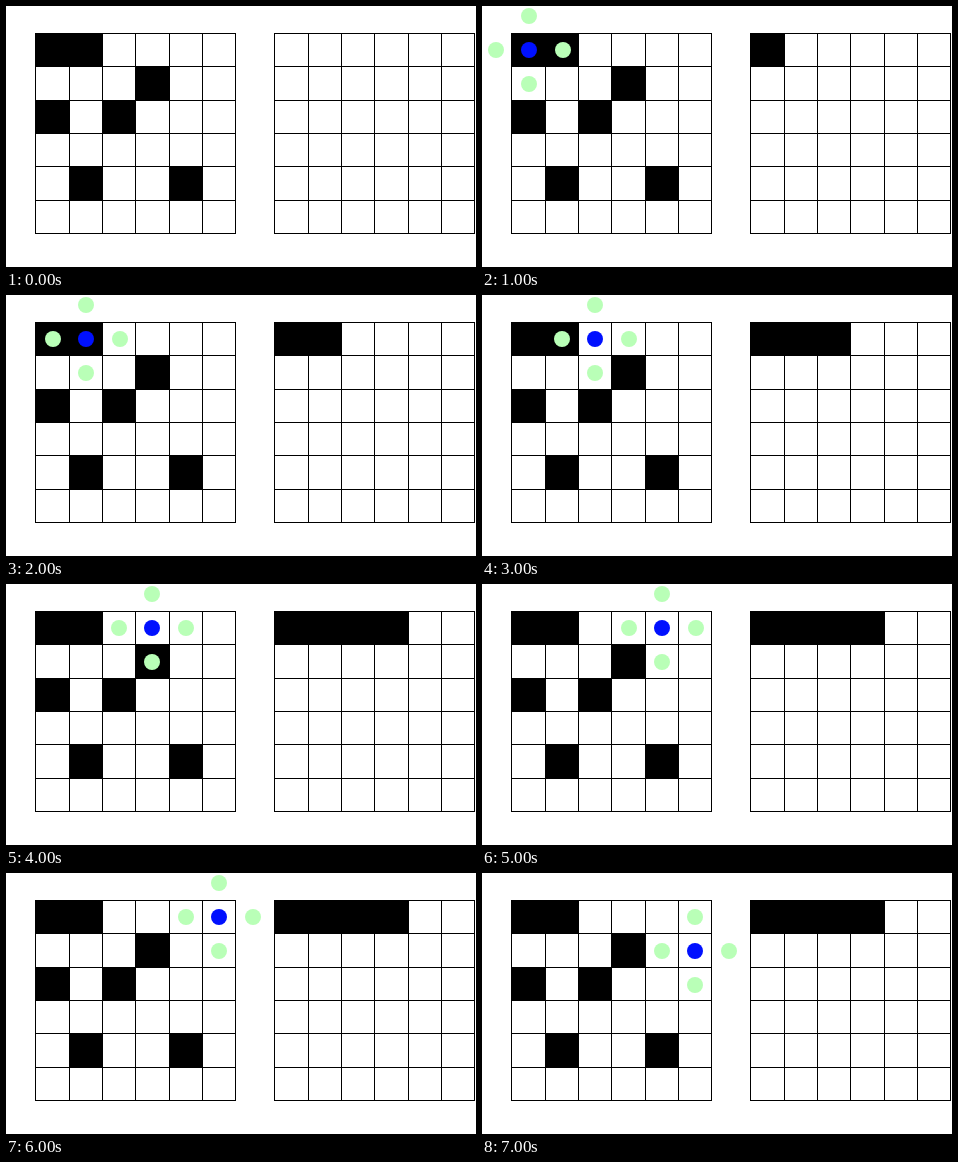
Write an HTML page with a canvas that moves like this. It is 470 px wide and 261 px high and loops after 8000 ms.

```html
<!DOCTYPE html>
<html lang="en">
<head>
<meta charset="utf-8">
<title>Grid dilation</title>
<style>
html, body { margin: 0; width: 100%; height: 100%; overflow: hidden; background: #fff; }
canvas { display: block; }
</style>
</head>
<body>
<canvas id="stage" width="470" height="261"></canvas>
<script>
const ctx = document.getElementById('stage').getContext('2d');
const N = 6, CELL = 100 / 3, STEP = 1000, STEPS = 8;
const LEFT = 29, RIGHT = 268, TOP = 27;
const seeds = [[0, 0], [1, 0], [3, 1], [0, 2], [2, 2], [1, 4], [4, 4]];
const around = [[0, 0], [-1, 0], [1, 0], [0, -1], [0, 1]];

const lineX = (x0, i) => Math.ceil(x0 + i * CELL - 0.01);
const lineY = j => Math.round(TOP + j * CELL);
const isSeed = (x, y) => seeds.some(([a, b]) => a === x && b === y);
const grows = (x, y) => around.some(([dx, dy]) => isSeed(x + dx, y + dy));

// Serpentine scan order
function scanCell(k) {
  const row = Math.floor(k / N), col = k % N;
  return [row % 2 ? N - 1 - col : col, row];
}

function drawGrid(x0, cells) {
  ctx.fillStyle = '#000';
  for (let i = 0; i <= N; i++) {
    ctx.fillRect(lineX(x0, i), TOP, 1, 201);
    ctx.fillRect(x0, lineY(i), 201, 1);
  }
  for (const [x, y] of cells) {
    const l = lineX(x0, x), t = lineY(y);
    ctx.fillRect(l, t, lineX(x0, x + 1) - l + 1, lineY(y + 1) - t + 1);
  }
}

function dot(x, y, color) {
  ctx.fillStyle = color;
  ctx.beginPath();
  ctx.arc(x, y, 8, 0, Math.PI * 2);
  ctx.fill();
}

function drawProbe([col, row]) {
  const x = Math.floor(47 + 33.3 * col), y = 44 + 34 * row;
  dot(x, y, '#0010ff');
  for (const [dx, dy] of [[-33, 0], [34, 0], [0, -34], [0, 34]]) {
    dot(x + dx, y + dy, '#b9ffb7');
  }
}

function render(step) {
  const scanned = Array.from({ length: step }, (_, k) => scanCell(k));
  ctx.fillStyle = '#fff';
  ctx.fillRect(0, 0, 470, 261);
  drawGrid(LEFT, seeds);
  drawGrid(RIGHT, scanned.filter(([x, y]) => grows(x, y)));
  if (step) drawProbe(scanned[step - 1]);
}

const start = performance.now();
function tick() {
  const t = Math.max(0, performance.now() - start);
  render(Math.floor(t / STEP) % STEPS);
  requestAnimationFrame(tick);
}
tick();
</script>
</body>
</html>
```
